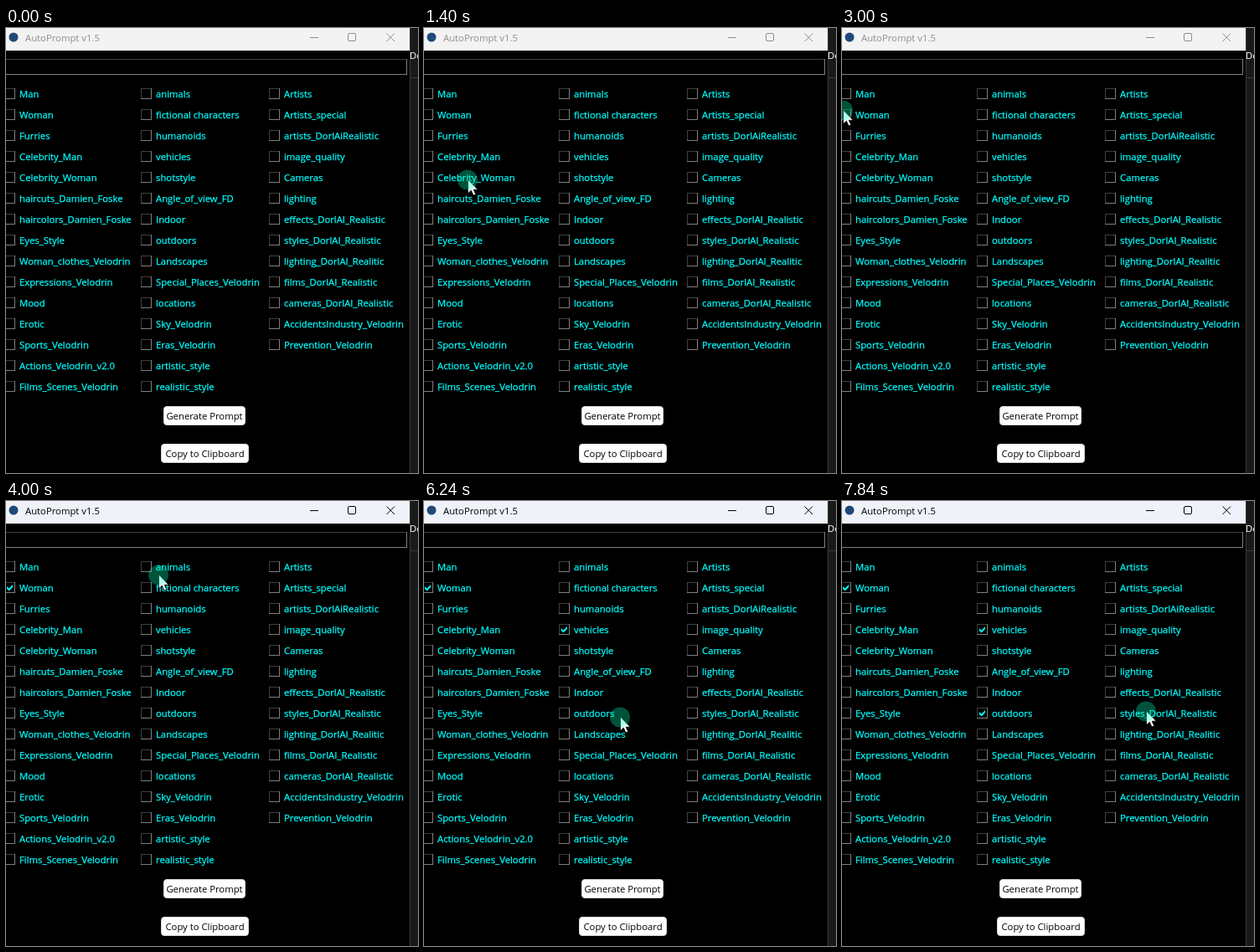
Write an HTML page that moves like this. It is 492 px wide and 532 px high and loops after 8 s.

```html
<!DOCTYPE html>
<html lang="en">
<head>
<meta charset="utf-8">
<title>AutoPrompt</title>
<style>
  html, body { margin: 0; width: 100%; height: 100%; overflow: hidden; background: #000; }
  svg { display: block; width: 100%; height: 100%; }
  text { font: 11.3px "Open Sans", "Noto Sans", sans-serif; white-space: pre; }
  .option { fill: #0ff; stroke: #0ff; stroke-width: .25; }
  .light { fill: #7f7f7f; }
  .shade { fill: #3f3f3f; }
  .tick { fill: #0ff; }
  .button { fill: #fff; stroke: #d8d8d8; }
  #bar { fill: #f3f3f3; }
  #caption { fill: #8e8e8e; }
  #controls { fill: none; stroke: #8e8e8e; }
  .focused #bar { fill: #eff3f9; }
  .focused #caption { fill: #000; }
  .focused #controls { stroke: #000; }
</style>
</head>
<body>
<svg id="stage" viewBox="0 0 492 532">
  <rect width="492" height="532"/>

  <!-- window behind -->
  <rect x="482" width="10" height="532" fill="#191919"/>
  <path d="M482 59.5h10M482.5 0v532" stroke="#3a3a3a"/>
  <text x="482" y="37" fill="#fff">De</text>

  <!-- title bar -->
  <rect id="bar" width="482" height="27"/>
  <circle cx="9" cy="11" r="5.5" fill="#1f4a78"/>
  <text id="caption" x="23" y="16">AutoPrompt v1.5</text>
  <g id="controls">
    <path d="M363 11.5h10M454.5 6.5l9.5 9.5M464 6.5l-9.5 9.5"/>
    <rect x="408.5" y="6.5" width="9" height="9" rx="1.5"/>
  </g>

  <g id="fields"></g>

  <rect class="button" x="188.5" y="452.5" width="97" height="22" rx="3.5"/>
  <text x="237" y="468" text-anchor="middle">Generate Prompt</text>
  <rect class="button" x="185.5" y="497.5" width="104" height="22" rx="3.5"/>
  <text x="237.5" y="513" text-anchor="middle">Copy to Clipboard</text>

  <!-- the highlight tints the arrow beneath it -->
  <g id="pointer">
    <path d="M.5 -1V15.7L4.3 12.2L7 18.1L9.8 16.9L7.2 11.2H12.3Z" fill="#fff" stroke="#000" stroke-width=".8"/>
    <circle cy="-.5" r="12" fill="#00ffb8" fill-opacity=".32"/>
  </g>
</svg>
<script>
const LOOP = 8000;
const STEP = 200;
const ROW_HEIGHT = 25;
const COLUMN_WIDTH = 153;

const columns = [
  "Man|Woman|Furries|Celebrity_Man|Celebrity_Woman|haircuts_Damien_Foske|haircolors_Damien_Foske|Eyes_Style|Woman_clothes_Velodrin|Expressions_Velodrin|Mood|Erotic|Sports_Velodrin|Actions_Velodrin_v2.0|Films_Scenes_Velodrin",
  "animals|fictional characters|humanoids|vehicles|shotstyle|Angle_of_view_FD|Indoor|outdoors|Landscapes|Special_Places_Velodrin|locations|Sky_Velodrin|Eras_Velodrin|artistic_style|realistic_style",
  "Artists|Artists_special|artists_DorlAiRealistic|image_quality|Cameras|lighting|effects_DorlAI_Realistic|styles_DorlAI_Realistic|lighting_DorlAI_Realitic|films_DorlAI_Realistic|cameras_DorlAI_Realistic|AccidentsIndustry_Velodrin|Prevention_Velodrin"
];

// When each option gets ticked, in ms; the first click also focuses the window.
const tickTimes = { Woman: 3200, vehicles: 5200, outdoors: 7040 };

// Where the pointer turns or rests.
const stops = [
  { time: 400, x: 363, y: 481 },
  { time: 1400, x: 52, y: 182 },
  { time: 2000, x: 76, y: 387 },
  { time: 3000, x: 1, y: 99 },
  { time: 3200, x: 1, y: 99 },
  { time: 3800, x: 205, y: 100 },
  { time: 4000, x: 182, y: 89 },
  { time: 4800, x: 174, y: 129 },
  { time: 5200, x: 177, y: 151 },
  { time: 5640, x: 177, y: 151 },
  { time: 6240, x: 234, y: 259 },
  { time: 6840, x: 170, y: 257 },
  { time: 7040, x: 170, y: 257 },
  { time: 7840, x: 363, y: 252 }
];

const byId = id => document.getElementById(id);
const stage = byId("stage"), pointer = byId("pointer");

// A sunken black field: dark top and left edges, lighter bottom and right ones.
function sunken(x, y, width, height) {
  return `<rect class="light" x="${x}" y="${y}" width="${width}" height="${height}"/>
    <rect class="shade" x="${x}" y="${y}" width="${width - 1}" height="${height - 1}"/>
    <rect x="${x + 1}" y="${y + 1}" width="${width - 2}" height="${height - 2}"/>`;
}

function option(label, column, row) {
  const x = 161 + (column - 1) * COLUMN_WIDTH - (column === 0 ? 10 : 0);
  const y = 72 + row * ROW_HEIGHT;
  const tick = label in tickTimes
    ? `<path class="tick" id="tick-${label}" d="M${x + 3} ${y + 5}l2.5 2.5l4.5 -4.5v3l-4.5 4.5l-2.5 -2.5z"/>` : "";
  return `${sunken(x, y, 13, 13)}${tick}<text class="option" x="${x + 18}" y="${y + 11}">${label}</text>`;
}

byId("fields").innerHTML = sunken(-2, 37, 481, 19) + columns.map((labels, column) =>
  labels.split("|").map((label, row) => option(label, column, row)).join("")).join("");

const show = (element, visible) => element.setAttribute("visibility", visible ? "visible" : "hidden");
const smooth = k => k * k * (3 - 2 * k);

function pointerAt(time) {
  const next = stops.findIndex(stop => stop.time > time);
  if (next < 0) return stops.at(-1);
  const from = stops[next - 1], to = stops[next];
  const k = smooth((time - from.time) / (to.time - from.time));
  return { x: from.x + (to.x - from.x) * k, y: from.y + (to.y - from.y) * k };
}

function render(time) {
  const t = time % LOOP;
  // The picture advances in steps, slightly delayed after the second click.
  const delay = t > 5500 ? 40 : 0;
  const stepped = Math.floor((t - delay) / STEP) * STEP + delay;
  const visible = stepped >= stops[0].time;
  show(pointer, visible);
  if (visible) {
    const { x, y } = pointerAt(stepped);
    pointer.setAttribute("transform", `translate(${Math.round(x)} ${Math.round(y)})`);
  }
  stage.classList.toggle("focused", t >= tickTimes.Woman);
  for (const label in tickTimes) show(byId("tick-" + label), t >= tickTimes[label]);
}

const startTime = performance.now();
function loop() {
  render(performance.now() - startTime);
  requestAnimationFrame(loop);
}
loop();
</script>
</body>
</html>
```
